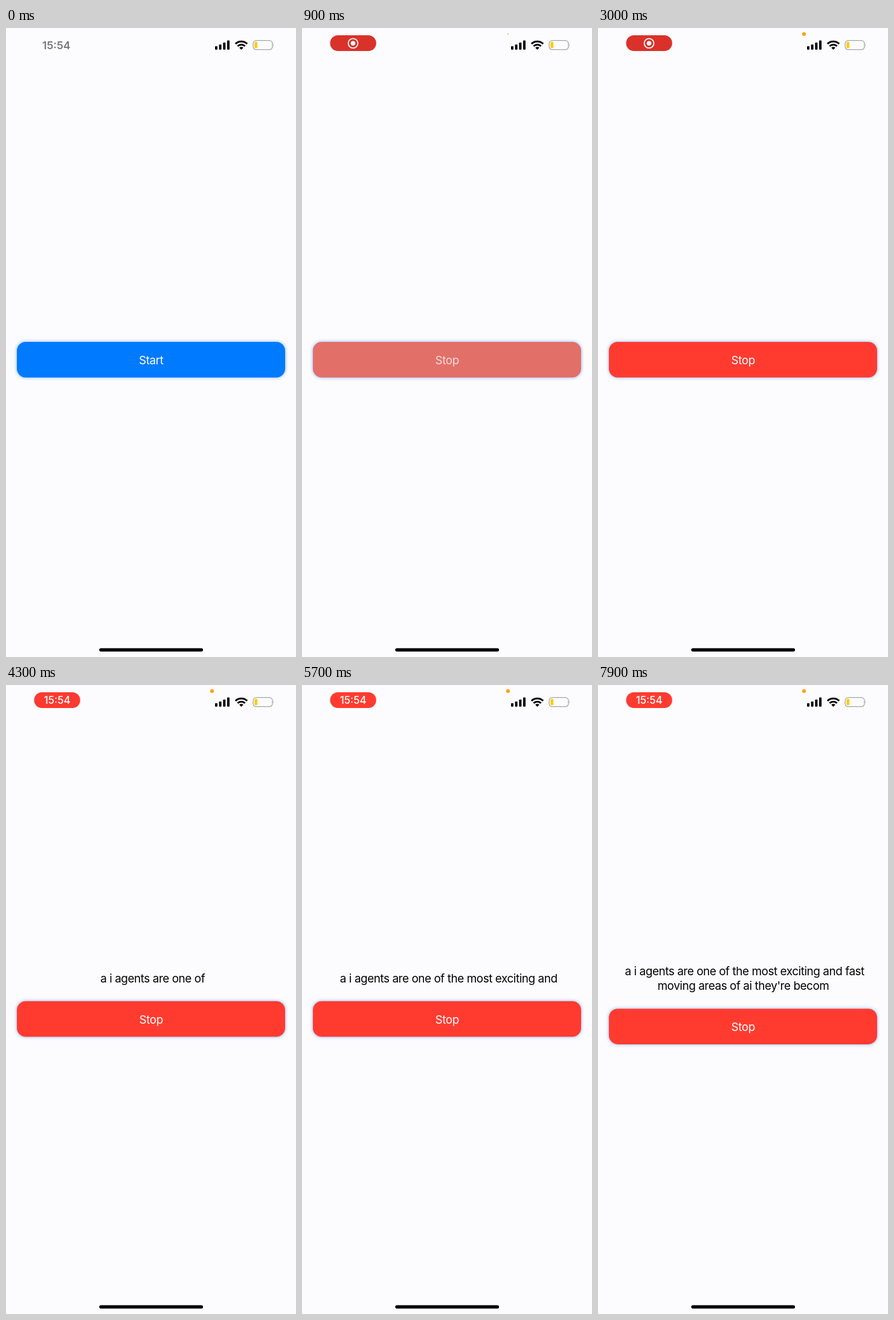
Recreate the animation shown at these times as an HTML page. Size 480 px wide and 1038 px high, loop 8000 ms.

```html
<!DOCTYPE html>
<html lang="en">
<head>
<meta charset="utf-8">
<title>Live transcription</title>
<style>
  html, body { margin: 0; width: 100%; height: 100%; overflow: hidden; background: #fcfcff; }
  svg { display: block; width: 100%; height: 100%; }
  text { font: 400 18.9px Inter, "Open Sans", sans-serif; letter-spacing: -.44px; text-anchor: middle; }
  #clock { font-size: 17.8px; font-weight: 600; letter-spacing: 0; fill: #77777a; }
  #pillTime { font-size: 17px; font-weight: 500; letter-spacing: 0; fill: #fff; }
  #line1, #line2 { fill: #000; }
  #shadow { fill: #a9c4f6; filter: blur(2.4px); }
</style>
</head>
<body>
<svg viewBox="0 0 480 1038">
  <rect width="480" height="1038" fill="#fcfcff"/>

  <text id="clock" x="83.3" y="35">15:54</text>
  <g id="pill">
    <rect id="pillBox" x="46.5" y="12" width="76.3" height="26" rx="13"/>
    <g id="record">
      <circle cx="84.5" cy="25.2" r="7.9" fill="none" stroke="#fff" stroke-width="1.8"/>
      <circle cx="84.5" cy="25.2" r="3.8" fill="#fff"/>
    </g>
    <text id="pillTime" x="84.7" y="31.3">15:54</text>
  </g>

  <circle id="mic" cx="341" cy="10" r="3.1" fill="#ff9f0a"/>
  <g fill="#000">
    <rect x="346" y="30" width="4" height="5.8" rx="1"/>
    <rect x="352.6" y="27.3" width="4" height="8.5" rx="1"/>
    <rect x="359.3" y="24" width="4" height="11.8" rx="1"/>
    <rect x="366" y="20.5" width="4" height="15.3" rx="1"/>
  </g>
  <g fill="none" stroke="#000" stroke-width="3">
    <path d="M379.8 26.2a14 14 0 0 1 19.4 0"/>
    <path d="M383.4 30a8.8 8.8 0 0 1 12.2 0"/>
    <path d="M389.5 36l-3.3-3.4a4.7 4.7 0 0 1 6.6 0z" fill="#000" stroke="none"/>
  </g>
  <rect x="409.1" y="20.7" width="31.8" height="15" rx="4.8" fill="none" stroke="#a4a4a7" stroke-width="1.3"/>
  <path d="M442.2 25.6q1.8 2.6 0 5.2z" fill="#a4a4a7"/>
  <rect x="411.3" y="22.8" width="4.8" height="10.8" rx="2" fill="#fc0"/>

  <text id="line1" x="242.7"></text>
  <text id="line2" x="240.5" y="503"></text>

  <g id="button">
    <rect id="shadow" x="17" y="517" width="446" height="60.7" rx="15.6"/>
    <rect id="face" x="18" y="518" width="444" height="58.7" rx="14.6"/>
    <text id="label" x="240.2" y="554.8" fill="#fff"></text>
  </g>

  <rect x="154.3" y="1023.5" width="171.8" height="5.4" rx="2.7" fill="#000"/>
</svg>
<script>
const LOOP = 8000, STEP = 100;
const RED = [255, 59, 48], DARK_RED = [217, 50, 42], BLUE = [0, 122, 255];
const $ = id => document.getElementById(id);
const set = (id, attrs) => {
  for (const key in attrs) $(id).setAttribute(key, attrs[key]);
};
const ramp = (t, from, to) => Math.max(0, Math.min(1, (t - from) / (to - from)));
const mix = (a, b, k) => `rgb(${a.map((v, i) => Math.round(v + (b[i] - v) * k))})`;

const faceSteps = [
  [0, BLUE], [500, BLUE], [650, [112, 172, 240]],
  [900, [226, 112, 104]], [1100, RED], [LOOP, RED]
];

// Time at which each chunk of speech is recognised
const speech = [
  [3400, "a i"], [3800, "agents"], [4000, "are"], [4200, "one of"],
  [4600, "the"], [4800, "most"], [5200, "exciting"], [5500, "and"],
  [6200, "fast moving"], [6700, "areas"], [7000, "of"], [7200, "ai"],
  [7500, "they're"], [7800, "becom"]
];

function faceColor(t) {
  const i = faceSteps.findIndex(step => step[0] > t);
  const [t0, a] = faceSteps[i - 1], [t1, b] = faceSteps[i];
  return mix(a, b, ramp(t, t0, t1));
}

function wrapSpeech(t) {
  const text = speech.filter(part => part[0] <= t).map(part => part[1]).join(" ");
  if (t < 6200) return [text, ""];
  const cut = text.indexOf(t < 6700 ? " fast" : " moving");
  return [text.slice(0, cut), text.slice(cut + 1)];
}

function draw(t) {
  const glow = Math.min(1, .7 * (1 - Math.cos((t - 900) / 1000 * Math.PI)));
  const shown = ramp(t, 100, 400);
  const swap = ramp(t, 3400, 3600);
  set("clock", { opacity: 1 - shown });
  set("pill", { opacity: shown });
  set("pillBox", { fill: mix(DARK_RED, RED, glow) });
  set("record", { opacity: 1 - swap });
  set("pillTime", { opacity: swap });
  set("mic", { r: t < 900 ? 0 : 1 + 2.1 * ramp(t, 900, 1100) });

  const [first, second] = wrapSpeech(t);
  $("line1").textContent = first;
  $("line2").textContent = second;
  set("line1", { y: second ? 478.5 : 490.8 });

  const shift = second ? 16.2 : first ? 3.8 : 0;
  set("button", { transform: `translate(0 ${shift})` });
  set("face", { fill: faceColor(t) });
  $("label").textContent = t < 800 ? "Start" : "Stop";
  set("label", { opacity: t < 800 ? 1 : .75 + .25 * ramp(t, 900, 1100) });
}

const start = performance.now();
function tick() {
  const t = (performance.now() - start) % LOOP;
  draw(Math.floor(t / STEP) * STEP);
  requestAnimationFrame(tick);
}
tick();
</script>
</body>
</html>
```
